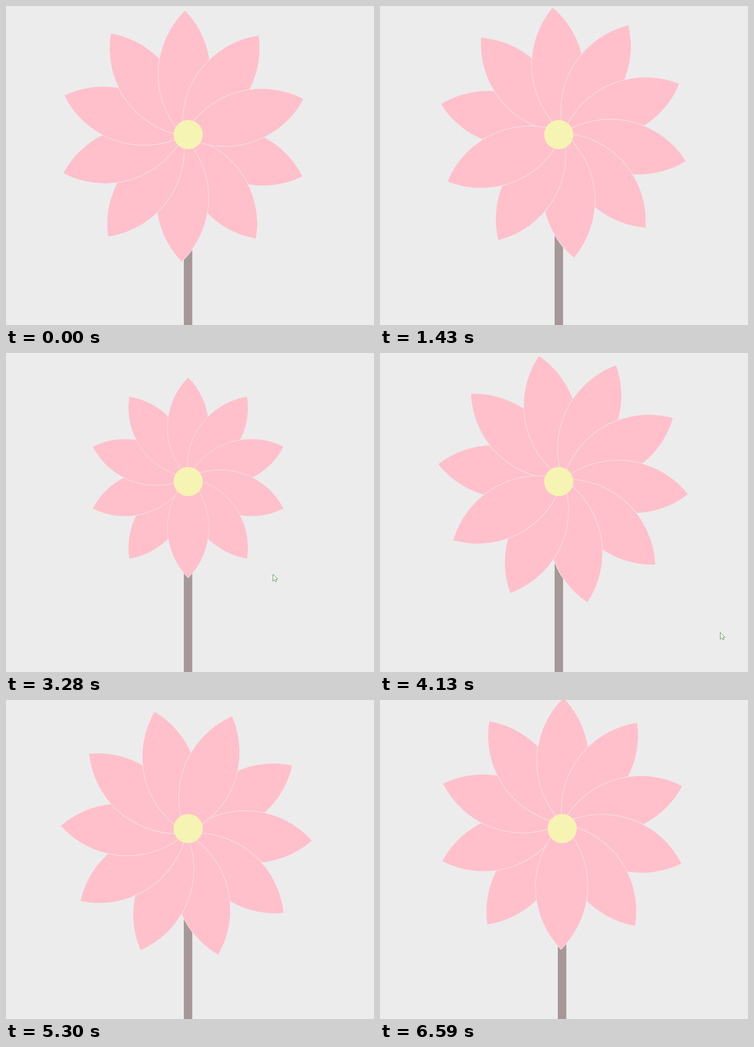
An HTML page with a canvas that plays this animation: 803x697 px, repeating every 6670 ms.

```html
<!DOCTYPE html>
<html lang="en">
<head>
<meta charset="utf-8">
<title>Pinwheel flower</title>
<style>
  html, body { margin: 0; width: 100%; height: 100%; overflow: hidden; background: #ececec; }
  canvas { display: block; }
</style>
</head>
<body>
<canvas id="stage" width="803" height="697"></canvas>
<script>
const ctx = document.getElementById('stage').getContext('2d');
const LOOP = 6670, STEPS = 87;
const HUB = { x: 397.5, y: 281, r: 31.8 };
const PETAL = 275;       // root to tip
const OFFSET = 10.9;     // petal root sits above the pivot
const TURN = 9.365;      // degrees per step

// Phases, in steps
const RELOAD = 22, STEM = 23.7, STEM_END = 31.2, HUB_END = 38;
const BLOOM = 37.5, SPIN = 47.5;

const clamp = v => Math.min(1, Math.max(0, v));
const span = (v, a, b) => clamp((v - a) / (b - a));
const mix = (a, b, u) => a + (b - a) * u;
const easeIn = u => u ** 2;
const easeOut = (u, power) => 1 - (1 - u) ** power;

function pose(step) {
  if (step < RELOAD) {
    return { angle: 252.8 + 9.175 * step, bloom: 1, hub: 1, top: HUB.y };
  }
  return {
    angle: Math.max(0, TURN * (step - SPIN)),
    bloom: easeOut(span(step, BLOOM, SPIN), 2),
    hub: span(step, STEM_END, HUB_END),
    top: mix(697, HUB.y, span(step, STEM, STEM_END))
  };
}

// Lens of two quarter circles, pointing up
function petal() {
  const r = PETAL / Math.SQRT2, h = PETAL / 2, q = Math.PI / 4;
  ctx.beginPath();
  ctx.arc(h, -h, r, Math.PI - q, Math.PI + q);
  ctx.arc(-h, -h, r, -q, q);
  ctx.closePath();
  ctx.fill();
  ctx.stroke();
}

function flower(angle, scale) {
  ctx.save();
  ctx.translate(HUB.x, HUB.y);
  ctx.rotate(angle * Math.PI / 180);
  ctx.scale(scale, scale);
  ctx.translate(0, -OFFSET);
  ctx.fillStyle = '#ffc0cb';
  ctx.strokeStyle = '#ececec';
  ctx.lineWidth = 1.1;
  ctx.rotate(Math.PI * 1.2);
  for (let i = 0; i < 10; i++) {
    petal();
    ctx.rotate(Math.PI / 5);
  }
  ctx.restore();
}

const arrow = new Path2D('M0 0V15L3.5 11.8L6 16.5L8.2 15.4L6 10.8H10.3Z');

function pointer(x, y) {
  ctx.save();
  ctx.translate(Math.round(x) + 0.5, Math.round(y) + 0.5);
  ctx.fillStyle = '#fff';
  ctx.strokeStyle = '#3c8f3c';
  ctx.lineWidth = 1;
  ctx.fill(arrow);
  ctx.stroke(arrow);
  ctx.restore();
}

// The pointer leaves for the top left, then comes back
function pointers(step) {
  if (step >= 2 && step <= 10) {
    const u = easeIn(span(step, 2, 10));
    pointer(mix(706, 45, u), mix(697, 115, u));
  } else if (step >= 36 && step <= 55) {
    const u = easeOut(span(step, 36, 54), 3);
    pointer(mix(40, 742, u), mix(54, 610, u));
  }
}

function draw(t) {
  const step = Math.floor(t / LOOP * STEPS + 0.45);
  const { angle, bloom, hub, top } = pose(step);
  const turn = angle % 360;
  // The layout recentres while the turned flower overflows the page
  const shift = turn > 19.5 && turn < 73 ? -7.5 : 0;

  ctx.fillStyle = '#ececec';
  ctx.fillRect(0, 0, 803, 697);
  ctx.fillStyle = '#a69898';
  ctx.fillRect(Math.round(388 + shift), top, 18.5, 697 - top);

  ctx.save();
  ctx.translate(shift, 0);
  if (bloom > 0) flower(angle, bloom);
  ctx.fillStyle = '#f6f4b2';
  ctx.beginPath();
  ctx.arc(HUB.x, HUB.y, HUB.r * hub, 0, Math.PI * 2);
  ctx.fill();
  ctx.restore();
  pointers(step);
}

const begin = performance.now();
function tick() {
  draw((performance.now() - begin) % LOOP);
  requestAnimationFrame(tick);
}
tick();
</script>
</body>
</html>
```
